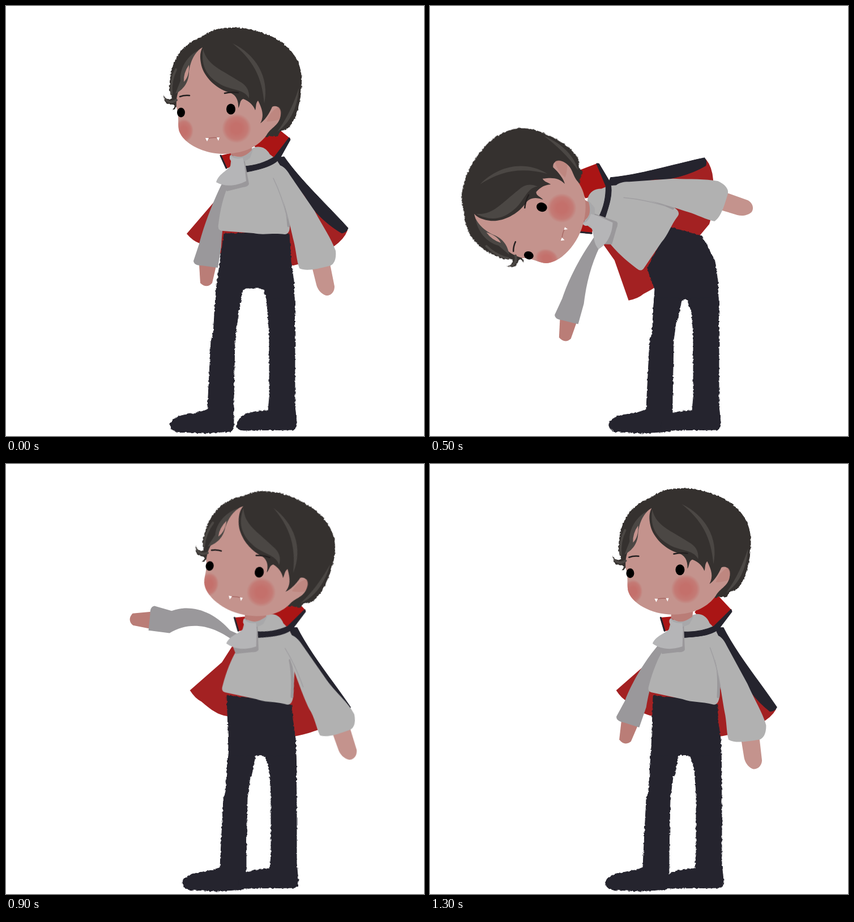
Recreate the animation shown at these times as an HTML page. Size 738 by 759 pixels, loop 1350 ms.

```html
<!DOCTYPE html>
<html lang="en">
<head>
<meta charset="utf-8">
<title>Bowing vampire</title>
<style>
  html, body { margin: 0; width: 100%; height: 100%; overflow: hidden; background: #fff; }
  svg { display: block; width: 100%; height: 100%; }
  .dark { fill: #25242e; stroke: #25242e; stroke-width: 1; stroke-linejoin: round; }
  .lining { fill: #a32122; }
  .collar { fill: #aa1515; }
  .shirt { fill: #b1b1b1; }
  .shade { fill: #9a989b; }
  .skin { fill: #c4938d; }
  .skin2 { fill: #ba7d77; }
  .hair { fill: #35312f; }
  .strand { fill: #4b4744; }
  .line { fill: none; stroke-linecap: round; }
</style>
</head>
<body>
<svg viewBox="0 0 738 759">
  <defs>
    <filter id="rough" color-interpolation-filters="sRGB">
      <feTurbulence type="fractalNoise" baseFrequency=".22" numOctaves="2" seed="4"/>
      <feDisplacementMap in="SourceGraphic" scale="4" xChannelSelector="R" yChannelSelector="G"/>
    </filter>
    <radialGradient id="blush">
      <stop offset=".35" stop-color="#c4706b"/>
      <stop offset=".75" stop-color="#c4706b" stop-opacity=".7"/>
      <stop offset="1" stop-color="#c4706b" stop-opacity="0"/>
    </radialGradient>
    <path id="faceShape" d="M347 73C335 80 325 92 322 105C325 122 320 132 309 142C302 152 300 165 301 180C306 190 303 205 305 218C310 240 345 261 385 261C425 260 447 246 460 228C468 214 480 212 484 197C488 180 478 174 470 178C465 190 456 203 449 207C456 194 453 183 445 167C440 172 442 180 440 184C437 176 430 168 419 164C412 166 414 175 410 180C411 165 405 155 392 152C370 145 350 125 345 105C342 92 342 82 347 73Z"/>
    <clipPath id="faceClip"><use href="#faceShape"/></clipPath>
  </defs>

  <g id="cape">
    <path class="lining" d="M385 308L368 345 319 402Q330 415 342 419C362 432 375 438 390 438L507 458C525 455 560 437 578 425Q597 412 603 396L480 275Z"/>
    <path class="dark" d="M477 268L491 266C520 308 570 354 604 392Q602 399 593 401C565 385 538 358 528 336L485 285Z"/>
  </g>

  <g id="backArm">
    <path class="skin2" d="M341 456L371 459 364 489C358 496 350 496 343 489Z"/>
    <path id="backSleeve" class="shade"/>
  </g>

  <g filter="url(#rough)">
    <path id="pelvis" class="dark"/>
    <path id="backLeg" class="dark" d="M370 515L366 578 362 592 357 690 356 712Q346 717 320 721C300 724 289 732 290 740Q291 752 310 752L350 754 396 751Q403 749 402 735L402 690 404 590 414 515Z"/>
    <path id="frontLeg" class="dark" d="M509 515L510 600 510 705 513 735Q513 748 506 748L420 749Q406 749 408 738C412 720 435 715 463 714L465 690 465 580 460 515Z"/>
  </g>

  <g id="torso">
    <path class="collar" d="M437 246L451 219 471 209 502 234 482 266 460 268Z"/>
    <path class="collar" d="M378 264L404 258 398 284 388 287Z"/>
    <path class="line" stroke="#25242e" stroke-width="3" d="M379 264L389 286"/>
    <path class="shirt" d="M398 266L440 249Q457 246 466 262C485 275 497 300 496 330L501 385Q502 403 492 403C470 400 455 405 437 401L383 397Q373 397 375 386C378 360 384 335 392 318Z"/>
    <path class="skin2" d="M395 240H434V259Q415 272 397 262Z"/>
    <path class="dark" d="M419 283C440 282 458 276 474 266L500 232 502 236 483 270C470 284 445 289 420 294Z"/>
    <path class="shade" d="M421 270L429 314Q428 319 418 320L390 327 384 316Z"/>
    <path fill="#a8a8aa" d="M397 262C410 272 425 265 437 251L431 268C420 277 405 280 396 270Z"/>
    <path fill="#b5b5b7" d="M396 263Q402 272 418 268L421 280 424 309C405 319 385 319 371 311C376 294 394 291 400 276Q392 270 396 263Z"/>
    <path class="line" stroke="#9a989b" stroke-width="5" d="M487 325Q496 350 499 388"/>
  </g>

  <g id="frontArm">
    <path class="skin" d="M540 460L572 455 580 495C580 507 571 512 565 511C556 508 550 500 548 492Z"/>
    <path id="frontSleeve" class="shirt"/>
    <path class="line" stroke="#a09fa2" stroke-width="1.5" d="M472 304Q487 335 497 375"/>
  </g>

  <g id="head">
    <g filter="url(#rough)">
      <path class="hair" d="M289 150C287 120 296 96 308 80C322 64 338 58 350 52C365 40 385 38 405 38C432 39 455 48 470 54C500 68 520 95 522 125C523 155 517 185 505 207Q498 220 486 220L479 230 470 229 460 231 430 215 400 190 330 150 304 178 292 184Q298 180 297 175C286 176 278 170 278 158Q284 168 293 163Z"/>
    </g>
    <use href="#faceShape" class="skin"/>
    <path class="skin2" opacity=".55" d="M460 204Q466 186 481 178Q489 184 483 200Q472 204 460 204Z"/>
    <g clip-path="url(#faceClip)" fill="url(#blush)">
      <circle cx="407" cy="216" r="26"/>
      <ellipse cx="314" cy="220" rx="17" ry="21"/>
    </g>
    <path class="strand" d="M348 76C355 105 380 112 412 133Q431 143 429 163C420 145 396 150 375 136C352 122 344 102 348 76Z"/>
    <path class="strand" d="M400 66C440 85 466 125 456 172C452 125 436 95 400 66Z"/>
    <path class="strand" d="M517 145C515 180 500 208 479 222C498 195 508 172 517 145Z"/>
    <path class="strand" d="M340 78C320 88 306 110 308 132Q304 142 299 155C312 148 323 136 323 116Q326 92 340 78Z"/>
    <path class="skin" d="M323 104Q313 118 314 134Q324 124 323 104Z"/>
    <path class="line" stroke="#4b4744" stroke-width="4" d="M300 112Q290 132 292 155M282 165Q290 173 301 166"/>
    <path class="line" stroke="#242020" stroke-width="2.5" d="M307 160Q315 157 324 158M386 154Q398 151 410 153"/>
    <ellipse cx="397" cy="182" rx="8" ry="9.5"/>
    <ellipse cx="309" cy="188" rx="7" ry="8.5"/>
    <path class="line" stroke="#a96a66" stroke-width="1.5" d="M355 234Q366 231 376 233"/>
    <path fill="#fff" d="M352 233H358L355 239ZM372 232H377L375 238Z"/>
  </g>
</svg>
<script>
  const LOOP = 1350, STEP = 50;

  // time, waist x, y, torso turn, neck dx, dy, head turn, back arm, front arm, back leg dx, front leg dx
  const poses = [
    [0, 437, 399, 0, 0, 0, 0, 0, 0, 0, 0],
    [300, 400, 418, -77.5, 4, -1, -86, -14.8, -87.3, 21, -6],
    [500, 407, 416, -60, 3, 1, -71, 6.3, -59.3, 26, 0],
    [650, 419, 416, -36, 0, -2, -49, 29.7, -24.6, 27, 6],
    [800, 436, 414, -6, 7, -3, -9, 66, -40, 24, 4],
    [900, 442, 413, 8, 10, -3, 11, 88, -5.7, 22, 3],
    [1100, 449.5, 414, 22, 8, -4, 24, 78, 2.7, 20, 3],
    [1300, 446, 413, 8, 15, -9, 0, 10, 4.8, 20, 5]
  ];

  const el = id => document.getElementById(id);
  const setPath = (id, d) => el(id).setAttribute('d', d);
  const slope = (i, c) => (poses[i + 1][c] - poses[i][c]) / (poses[i + 1][0] - poses[i][0]);

  // Monotone tangent: flat at ends and turning points.
  function tangent(i, c) {
    if (i === 0 || i === poses.length - 1) return 0;
    const a = slope(i - 1, c), b = slope(i, c);
    return a * b > 0 ? 2 * a * b / (a + b) : 0;
  }

  function poseAt(t) {
    let i = 0;
    while (i < poses.length - 2 && t >= poses[i + 1][0]) i++;
    const p = poses[i], q = poses[i + 1], d = q[0] - p[0];
    const u = (t - p[0]) / d, v = 1 - u;
    return p.slice(1).map((a, k) => {
      const c = k + 1;
      return a * (1 + 2 * u) * v * v + q[c] * u * u * (3 - 2 * u)
        + d * u * v * (v * tangent(i, c) - u * tangent(i + 1, c));
    });
  }

  function spin([x, y], degrees, [cx, cy]) {
    const a = degrees * Math.PI / 180, s = Math.sin(a), c = Math.cos(a);
    return [cx + x * c - y * s, cy + x * s + y * c];
  }

  function place(id, at, turn, pivot) {
    el(id).setAttribute('transform',
      `translate(${at}) rotate(${turn}) translate(${-pivot[0]} ${-pivot[1]})`);
  }

  // Sleeves flex sideways at the elbow as the arms swing.
  function drawSleeves(back, front) {
    setPath('backSleeve', `M386 304L379 318C${366 - back} 345 ${350 - back} 385 341 420L331 450
      Q332 458 345 458L374 462 380 425C${382 - back} 390 ${386 - back} 350 403 306Z`);
    setPath('frontSleeve', `M470 288C478 274 492 282 501 298L${545 + front} 362
      C${560 + front} 390 574 410 582 432C584 450 577 458 570 459C550 464 530 469 518 463
      C513 450 512 430 ${508 + front / 2} 415C${501 + front} 385 ${490 + front} 335 470 288Z`);
  }

  function draw(t) {
    const [x, y, turn, dx, dy, headTurn, backTurn, frontTurn, back, front] = poseAt(t);
    const onTorso = (px, py) => spin([px, py], turn, [x, y]);

    place('cape', [x, y], turn, [437, 399]);
    place('torso', [x, y], turn, [437, 399]);
    place('head', onTorso(dx - 27, dy - 137), headTurn, [410, 262]);
    place('backArm', onTorso(-42, -99), backTurn, [395, 300]);
    place('frontArm', onTorso(41, -107), frontTurn, [478, 292]);
    place('backLeg', [back, 0], 0, [0, 0]);
    place('frontLeg', [front, 0], 0, [0, 0]);
    drawSleeves(backTurn * .24, (frontTurn - turn) * .6);

    const crotch = 498 + (y - 399) * 1.1;
    const hip = turn > 0 ? onTorso(63, 3) : spin([-8, -88], turn * .22, [508 + front, 490]);
    const outline = [
      onTorso(-52, 3), onTorso(30, 0), hip,
      [503 + front, 450], [508 + front, 485], [510 + front, 545],
      [463 + front, crotch + 28], [455 + front, crotch + 3], [448 + front, crotch],
      [424 + back, crotch], [418 + back, crotch + 3], [411 + back, crotch + 38],
      [368 + back, 545], [371 + back, 500]
    ];
    setPath('pelvis', `M${outline.join('L')}Z`);
  }

  function tick() {
    draw(Math.floor(performance.now() % LOOP / STEP) * STEP);
    requestAnimationFrame(tick);
  }
  tick();
</script>
</body>
</html>
```
